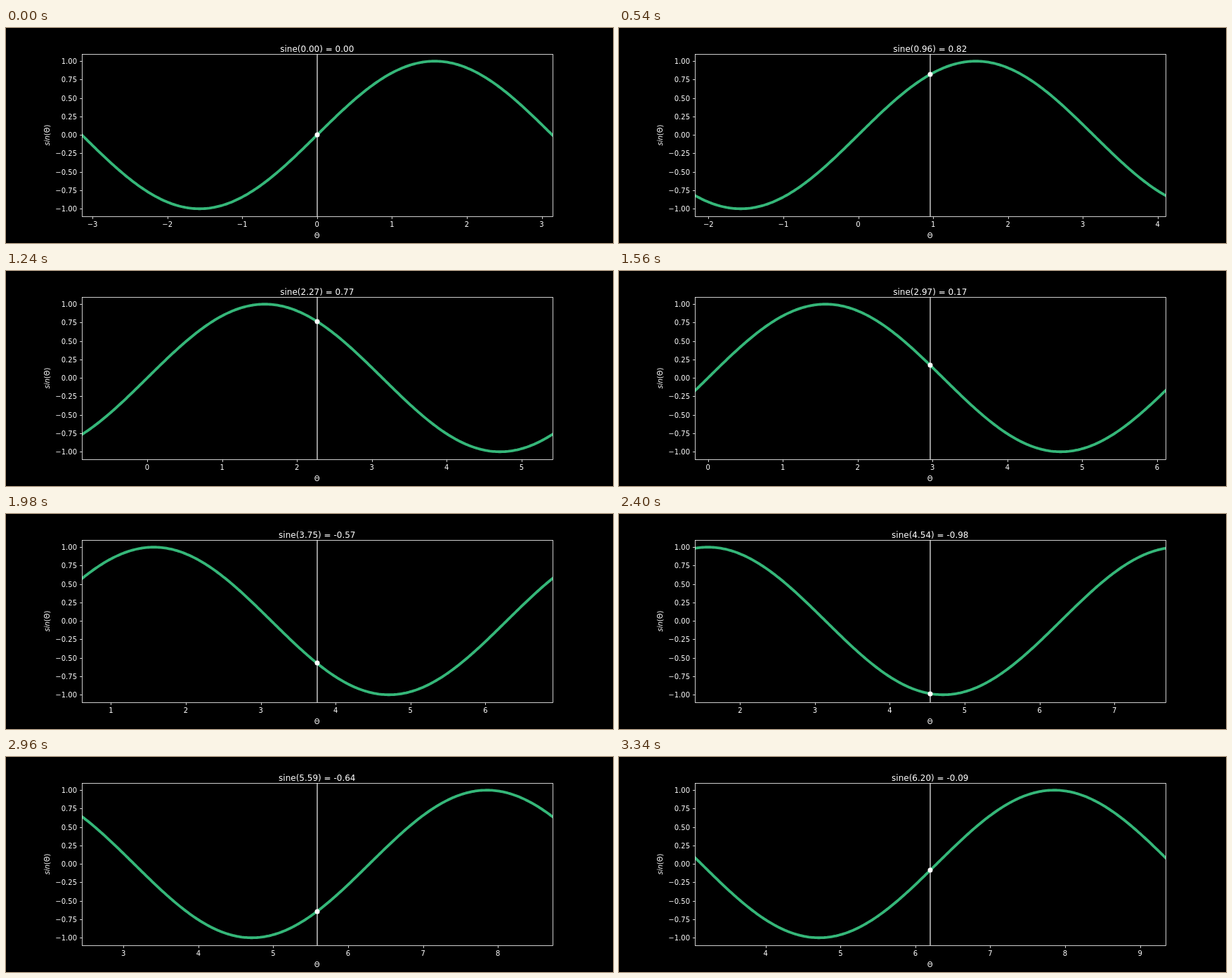
An HTML page for the animation above (3440 ms loop, 864 px wide and 306 px high).

```html
<!DOCTYPE html>
<html lang="en">
<head>
<meta charset="utf-8">
<title>Sine sweep</title>
<style>
  html, body { margin: 0; width: 100%; height: 100%; overflow: hidden; background: #000; }
  svg { display: block; width: 864px; height: 306px; }
  text { fill: #fff; font: 10px "DejaVu Sans", sans-serif; text-anchor: middle; }
  .title { font-size: 12px; }
  .y { text-anchor: end; }
  .it { font-style: oblique; }
  .axis { fill: none; stroke: #fff; stroke-width: .8; }
  .curve { fill: none; stroke: #35b779; stroke-width: 3.8; stroke-linejoin: round; }
  .now { stroke: #fff; stroke-width: 1.5; stroke-opacity: .78; }
</style>
</head>
<body>
<svg viewBox="0 0 864 306">
  <defs>
    <clipPath id="plot"><rect x="108" y="37" width="670" height="231"/></clipPath>
  </defs>
  <g clip-path="url(#plot)">
    <path id="curve" class="curve"/>
    <path class="now" d="M443 37V268"/>
  </g>
  <circle id="dot" cx="443" cy="152" r="3.5" fill="#fff"/>
  <rect class="axis" x="108.5" y="37.5" width="670" height="231"/>
  <g id="ticks"></g>
  <text id="title" class="title" x="442.8" y="34"></text>
  <text x="442.8" y="299">Θ</text>
  <text transform="translate(62 152.5) rotate(-90)"><tspan class="it">sin</tspan>(Θ)</text>
</svg>
<script>
  const LOOP = 3440, STEPS = 72;
  const MID_X = 442.8, MID_Y = 152.235;
  const UNIT_X = 669.6 / (2 * Math.PI), UNIT_Y = 105.01;

  const byId = id => document.getElementById(id);
  const curve = byId('curve'), dot = byId('dot'), title = byId('title'), ticks = byId('ticks');
  const yOf = v => MID_Y - v * UNIT_Y;
  const minus = s => s.replace('-', '\u2212');

  function add(parent, tag, attrs, label) {
    const el = document.createElementNS('http://www.w3.org/2000/svg', tag);
    for (const k in attrs) el.setAttribute(k, attrs[k]);
    if (label) el.textContent = label;
    parent.append(el);
    return el;
  }

  for (let v = -1; v <= 1; v += 0.25) {
    const y = Math.round(yOf(v));
    add(ticks, 'path', { class: 'axis', d: `M108.5 ${y + 0.5}h-3.5` });
    add(ticks, 'text', { class: 'y', x: 101, y: y + 4 }, minus(v.toFixed(2)));
  }

  const xTicks = [];
  for (let n = -3; n <= 9; n++) {
    xTicks.push({
      n,
      mark: add(ticks, 'path', { class: 'axis', d: 'M.5 268.5v3.5' }),
      label: add(ticks, 'text', { y: 283 }, minus(String(n)))
    });
  }

  // The whole wave is built once, then slid behind the clip.
  let d = '';
  for (let a = -3.3; a < 9.6; a += 0.02) {
    d += (d ? 'L' : 'M') + (a * UNIT_X).toFixed(2) + ' ' + yOf(Math.sin(a)).toFixed(2);
  }
  curve.setAttribute('d', d);

  // Steps are held for 20, 100 and 20 ms in turn.
  function stepAt(t) {
    const r = t % 140;
    const step = 3 * Math.floor(t / 140) + (r < 20 ? 0 : r < 120 ? 1 : 2);
    return Math.min(step, STEPS - 1);
  }

  function draw(step) {
    const a = step * 2 * Math.PI / STEPS, s = Math.sin(a);
    const zero = MID_X - a * UNIT_X;
    curve.setAttribute('transform', `translate(${zero} 0)`);
    dot.setAttribute('cy', Math.round(yOf(s)));
    const value = s.toFixed(2);
    title.textContent = `sine(${a.toFixed(2)}) = ${value === '-0.00' ? '0.00' : value}`;
    for (const { n, mark, label } of xTicks) {
      const x = zero + n * UNIT_X;
      const show = Math.abs(n - a) <= Math.PI ? 'visible' : 'hidden';
      mark.setAttribute('visibility', show);
      label.setAttribute('visibility', show);
      mark.setAttribute('transform', `translate(${Math.round(x)} 0)`);
      label.setAttribute('x', x);
    }
  }

  let start = null, last = 0;
  function tick(now) {
    if (start === null) start = now;
    const step = stepAt((now - start) % LOOP);
    if (step !== last) draw(last = step);
    requestAnimationFrame(tick);
  }
  draw(0);
  requestAnimationFrame(tick);
</script>
</body>
</html>
```
